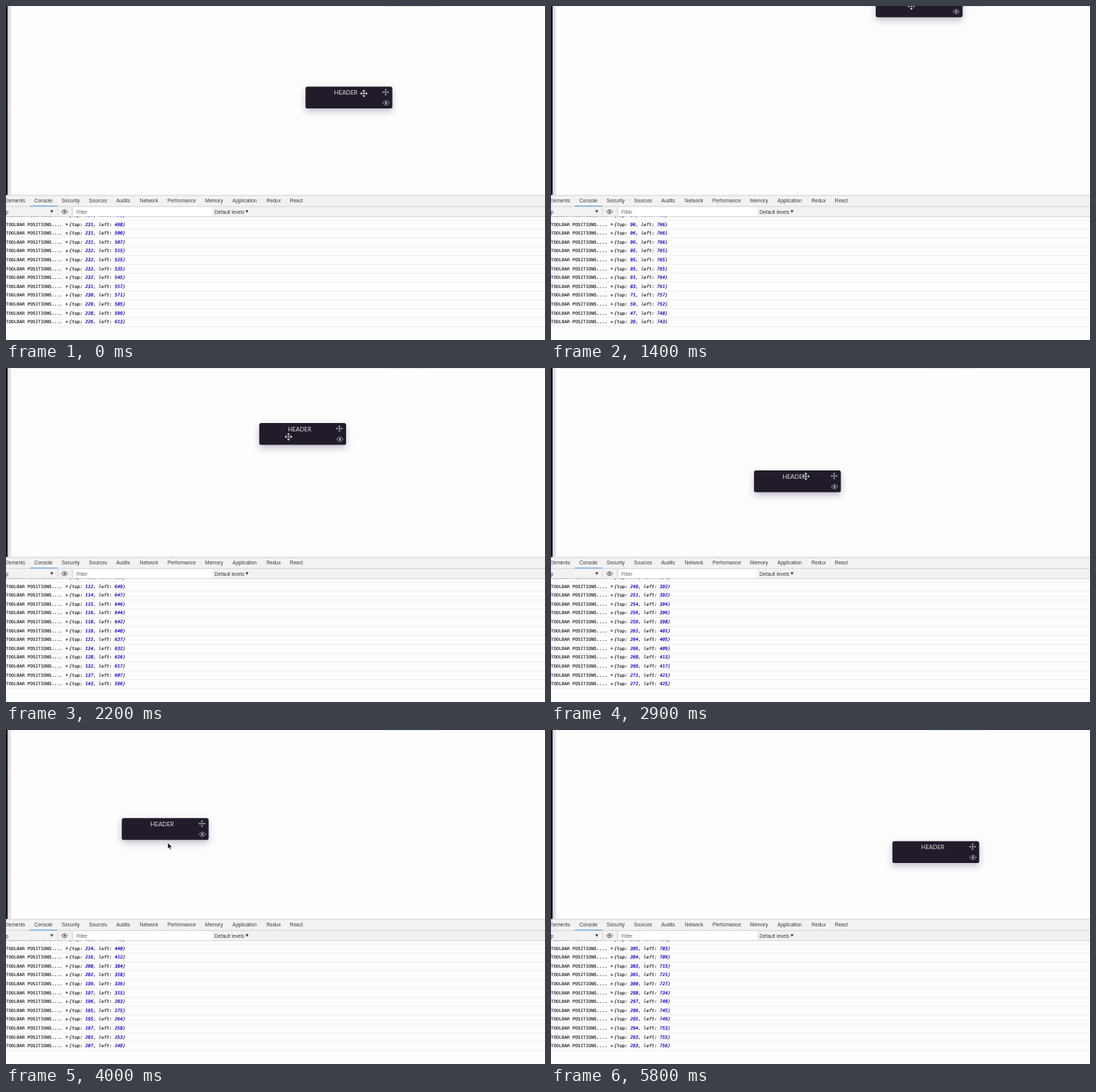
These frames come from a looping animation (704x437 px, 5.9 s). An HTML page:

```html
<!DOCTYPE html>
<html lang="en">
<head>
<meta charset="utf-8">
<title>Draggable toolbar with console log</title>
<style>
  html, body { margin: 0; width: 100%; height: 100%; overflow: hidden; background: #fefdfe; }
  svg { display: block; width: 704px; height: 437px; }
  .ui { font: 6.5px "Liberation Sans", Arial, sans-serif; fill: #3c3c3c; }
  .row { font: 5.82px "DejaVu Sans Mono", monospace; fill: #161616; stroke: #161616; stroke-width: .12; white-space: pre; }
  .obj { font-style: italic; }
  .num { fill: #1500c4; stroke: #1500c4; stroke-width: .22; }
  .title { font: 7.7px Lato, sans-serif; fill: #dcdae0; text-anchor: middle; }
</style>
</head>
<body>
<svg viewBox="0 0 704 437" xmlns="http://www.w3.org/2000/svg">
  <defs>
    <linearGradient id="edge">
      <stop offset="0" stop-color="#c8c6c9"/>
      <stop offset="1" stop-color="#fefdfe"/>
    </linearGradient>
    <filter id="shadow" x="-20%" y="-50%" width="140%" height="240%">
      <feDropShadow dx="0" dy="4" stdDeviation="4" flood-color="#3a3150" flood-opacity=".3"/>
    </filter>
    <clipPath id="page"><rect width="704" height="247.5"/></clipPath>
    <clipPath id="list"><rect y="275.8" width="704" height="162"/></clipPath>
  </defs>

  <rect width="704" height="437" fill="#fefdfe"/>
  <rect x="2" width="6" height="248" fill="url(#edge)"/>
  <rect width="2" height="248" fill="#0b0a0c"/>
  <rect x="8" width="696" height="1" fill="#eff1f3"/>
  <path d="M493 .5H564" stroke="#cfe8f3" stroke-dasharray="3 2"/>

  <g clip-path="url(#page)">
    <g id="box">
      <rect width="113.4" height="28.5" rx="2.6" fill="#201b2b" filter="url(#shadow)"/>
      <text class="title" x="52.7" y="10.6">HEADER</text>
      <g fill="none" stroke="#d5d3da" stroke-width=".65">
        <path transform="translate(104.7 7.2)" d="M-4 0H4M0-4V4M-2.7-1.3L-4 0l1.3 1.3M2.7-1.3L4 0 2.7 1.3M-1.3-2.7L0-4l1.3 1.3M-1.3 2.7L0 4l1.3-1.3"/>
        <path transform="translate(105.2 21.2)" d="M-4.2 0Q0-5.8 4.2 0Q0 5.8-4.2 0Z"/>
        <circle cx="105.2" cy="21.2" r="1" fill="#d5d3da"/>
      </g>
    </g>
  </g>

  <rect y="247.5" width="704" height="28" fill="#f3f2f3"/>
  <path d="M0 247.8H704M0 262.3H704M0 275.6H704" stroke="#cfcecf" stroke-width=".8"/>
  <rect x="31" y="261.2" width="36" height="1.1" fill="#62a6e8"/>
  <g id="tabs" class="ui"></g>
  <rect x="89" y="263.2" width="180" height="11.8" fill="#fff"/>
  <path d="M67.5 264V274M86.5 264V274" stroke="#d2d2d2" stroke-width=".8"/>
  <g class="ui">
    <text x="-.5" y="271.5">p</text>
    <text x="92" y="271.5" fill="#666">Filter</text>
    <text x="272.3" y="271.5">Default levels</text>
    <path d="M57.8 267.2h4l-2 3.6zM312.8 267.2h4l-2 3.6z"/>
  </g>
  <g transform="translate(76.5 269.1)" fill="none" stroke="#555">
    <path d="M-4 0Q0-5.2 4 0Q0 5.2-4 0Z"/>
    <circle r="1.4" fill="#555" stroke="none"/>
  </g>

  <g id="rows" clip-path="url(#list)"></g>

  <g id="move" fill="#fff" stroke="#17131f" stroke-width=".5">
    <path d="M0-5.2L2.4-2.4H-2.4ZM0 5.2L2.4 2.4H-2.4ZM-5.2 0L-2.4-2.4V2.4ZM5.2 0L2.4-2.4V2.4Z"/>
    <path d="M-.6-2.4H.6V-.6H2.4V.6H.6V2.4H-.6V.6H-2.4V-.6H-.6Z"/>
  </g>
  <path id="arrow" d="M0 0V8.6L2 6.8 3.3 9.8 4.7 9.2 3.4 6.3H6Z" fill="#111" stroke="#fff" stroke-width=".7"/>
</svg>

<script>
const LOOP = 5900, STEP = 100;
const ROWS = 12, PITCH = 11.6, EVENT = 1000 / 60, LOG_LAG = 70;
const HOLD_FROM = 500, HOLD_TO = 800, DROP = 4900, EXIT = 5500;
const LEAD = 75, GRIP = [58, 8.5];
const NS = 'http://www.w3.org/2000/svg';
const $ = id => document.getElementById(id);

// Turning points of the drag: time, top, left in logged units
const drag = [
  [-253, 231, 498], [-170, 232, 535], [0, 223, 660], [450, 230, 793], [750, 230, 793],
  [1147, 96, 766], [1230, 95, 765], [1330, 39, 743], [1460, 3, 700], [1947, 112, 649],
  [2047, 121, 637], [2200, 164, 554], [2647, 249, 392], [2865, 273, 432], [3350, 257, 522],
  [3680, 247, 507], [3814, 199, 335], [3880, 195, 264], [4000, 240, 239], [4100, 290, 245],
  [4347, 326, 475], [4530, 312, 661], [4647, 305, 703], [4830, 293, 756]
];

const slope = (i, axis) => {
  const a = drag[i], b = drag[i + 1];
  return a && b ? (b[axis] - a[axis]) / (b[0] - a[0]) : 0;
};

// Harmonic mean of both slopes: smooth, without overshoot
function tangent(i, axis) {
  const before = slope(i - 1, axis), after = slope(i, axis);
  return before * after > 0 ? 2 * before * after / (before + after) : 0;
}

function dragAt(t) {
  const end = drag.length - 1;
  t = Math.max(drag[0][0], Math.min(t, drag[end][0]));
  const i = Math.max(0, drag.findIndex(key => key[0] >= t) - 1);
  const a = drag[i], b = drag[i + 1], span = b[0] - a[0], k = (t - a[0]) / span;
  const ease = k * k * (3 - 2 * k);
  return [1, 2].map(axis =>
    a[axis] + (b[axis] - a[axis]) * ease
    + span * k * (1 - k) * ((1 - k) * tangent(i, axis) - k * tangent(i + 1, axis)));
}

function boxAt(t) {
  const [top, left] = dragAt(t);
  return [left * 0.57 + 15, top * 0.57 - 21.5];
}

// The pointer runs ahead of the box, then wanders off after the drop.
function pointerAt(t) {
  const [x, y] = boxAt(t + LEAD);
  const hand = [x + GRIP[0], Math.max(0, y + GRIP[1])];
  if (t <= DROP) return hand;
  const k = (t - DROP) / (EXIT - DROP), ease = k * k * (3 - 2 * k);
  return [hand[0] + (130 - hand[0]) * ease, hand[1] + (403 - hand[1]) * ease];
}

// Entries are counted only while the pointer moves.
const HOLD = HOLD_TO - HOLD_FROM;
const active = t => t < HOLD_FROM ? t : Math.max(HOLD_FROM, Math.min(t, DROP) - HOLD);
const lastEntry = t => Math.round(active(t) / EVENT);

function entry(n) {
  const t = n * EVENT;
  return dragAt((t < HOLD_FROM ? t : t + HOLD) - LOG_LAG).map(Math.round);
}

function add(parent, tag, attrs, text) {
  const el = document.createElementNS(NS, tag);
  for (const key in attrs) el.setAttribute(key, attrs[key]);
  if (text) el.textContent = text;
  return parent.appendChild(el);
}

const tabs = {
  Elements: -2, Console: 37, Security: 72.8, Sources: 108.2, Audits: 144, Network: 174.8,
  Performance: 211, Memory: 260, Application: 295.8, Redux: 340.2, React: 370.8
};
for (const name in tabs) add($('tabs'), 'text', { x: tabs[name], y: 257.1 }, name);

// One extra row is mostly hidden above the list.
function addRow(i) {
  const y = 287.6 + i * PITCH, rows = $('rows');
  add(rows, 'path', { d: `M0 ${y + 4.2}H704`, stroke: '#efeeef', 'stroke-width': 0.8 });
  add(rows, 'text', { class: 'row', x: 0, y }, 'TOOLBAR POSITIONS....');
  add(rows, 'path', { d: `M78.3 ${y - 3.8}l3 1.9-3 1.9z`, fill: '#5e5e5e' });
  const obj = add(rows, 'text', { class: 'row obj', x: 82.5, y });
  const word = text => add(obj, 'tspan', {}, text);
  const num = () => add(obj, 'tspan', { class: 'num' });
  word('{top: ');
  const top = num();
  word(', left: ');
  const left = num();
  word('}');
  return [top, left];
}
const cells = Array.from({ length: ROWS + 1 }, (_, i) => addRow(i - 1));

function place(el, [x, y], visible = true) {
  el.setAttribute('transform', `translate(${x} ${y})`);
  el.style.display = visible ? '' : 'none';
}

function draw(t) {
  const box = boxAt(t), pointer = pointerAt(t);
  const outside = t > DROP || pointer[1] - box[1] > 24;
  place($('box'), box);
  place($('move'), pointer, !outside);
  place($('arrow'), pointer, outside && t <= EXIT);

  const last = lastEntry(t);
  cells.forEach((cell, i) => {
    const values = entry(last - ROWS + i);
    cell.forEach((el, axis) => el.textContent = values[axis]);
  });
}

const start = performance.now();
let shown = -1;
function tick() {
  const t = Math.floor(((performance.now() - start) % LOOP) / STEP) * STEP;
  if (t !== shown) draw(shown = t);
  requestAnimationFrame(tick);
}
tick();
</script>
</body>
</html>
```
